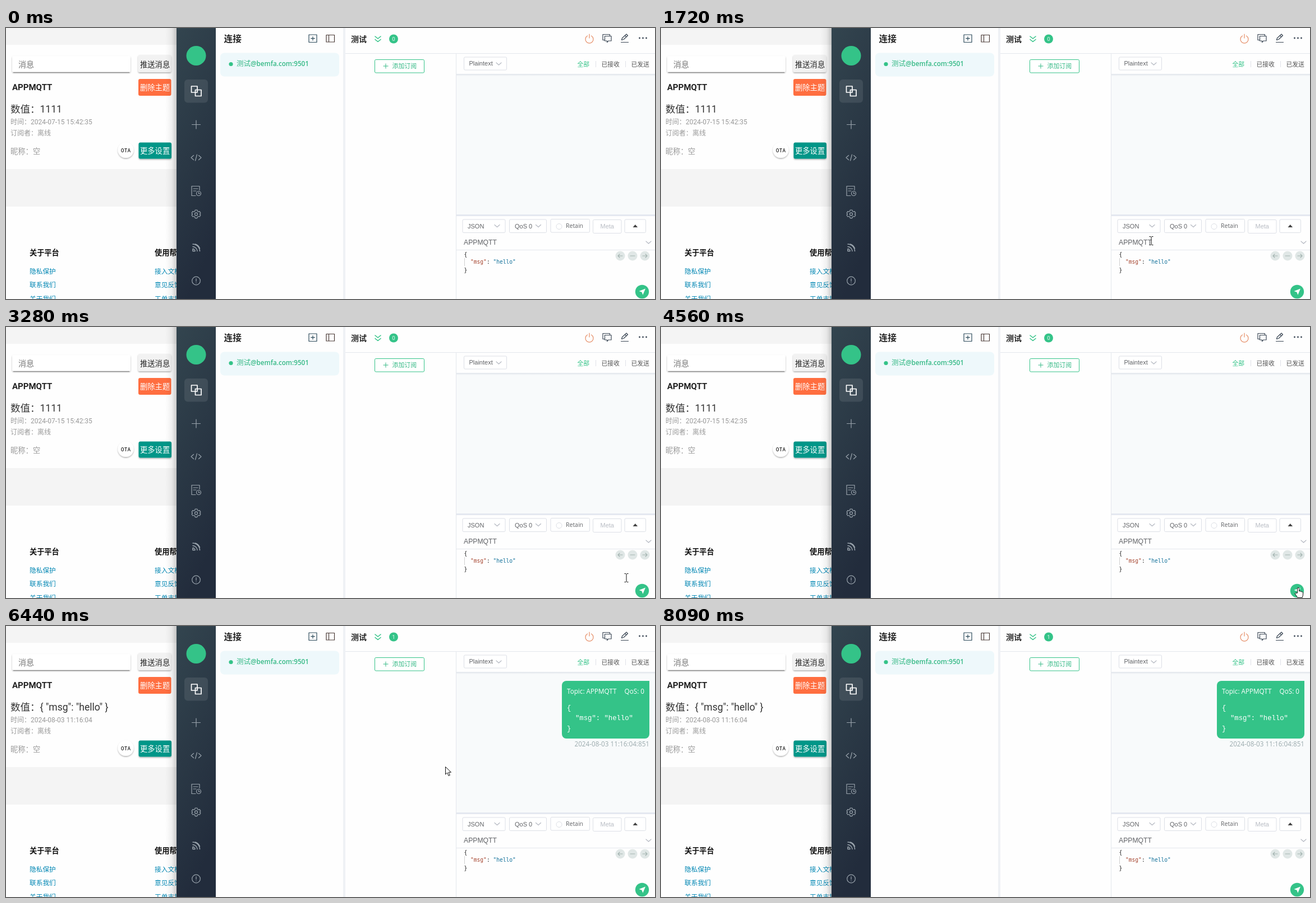
An HTML page that plays this animation: 1157x484 px, repeating every 8.16 s.

```html
<!DOCTYPE html>
<html lang="zh-CN">
<head>
<meta charset="utf-8">
<style>
html, body { margin: 0; width: 100%; height: 100%; overflow: hidden; background: #fff }
svg { display: block; width: 100vw; height: 100vh }
text { white-space: pre; font: 12px Roboto, "Noto Sans CJK SC", "Noto Sans CJK", sans-serif }
.app text { font-family: "Open Sans", "Noto Sans CJK SC", "Noto Sans CJK", sans-serif; font-size: 11.7px }
.app .ui text { font-family: "Liberation Sans", Arial, sans-serif; font-size: 11px; fill: #606266 }
.app .code text { font-family: "DejaVu Sans Mono", monospace; font-size: 9.6px }
.app .msg .code text { font-family: "Liberation Mono", monospace; font-size: 12.25px }
.app .topic text { font-family: "Liberation Sans", Arial, sans-serif; font-size: 12.2px }
.btn text { font-size: 13.3px; font-weight: 500 }
.foot text { font-size: 13.2px; font-weight: 700 }
.foot .links text { font-size: 11.7px; font-weight: 500 }
.line { fill: none; stroke-width: 1.2; stroke-linecap: round; stroke-linejoin: round }
.box rect { fill: #fff; stroke: #dcdfe6 }
</style>
</head>
<body>
<svg viewBox="0 0 1157 484" preserveAspectRatio="none">
<defs>
  <linearGradient id="bar" x2="0.3" y2="1"><stop stop-color="#33454f"/><stop offset="1" stop-color="#222c3c"/></linearGradient>
  <linearGradient id="edge"><stop stop-color="#000" stop-opacity="0"/><stop offset=".55" stop-color="#000" stop-opacity=".05"/><stop offset="1" stop-color="#000" stop-opacity=".2"/></linearGradient>
  <linearGradient id="fall" x2="0" y2="1"><stop stop-color="#dfe4ea"/><stop offset="1" stop-color="#f8fafb"/></linearGradient>
  <filter id="lift" x="-20%" y="-20%" width="140%" height="160%"><feDropShadow dx="0" dy="1.5" stdDeviation="1.2" flood-opacity=".32"/></filter>
  <clipPath id="selClip"><rect class="sel" x="876" y="369" width="0" height="27"/></clipPath>
</defs>

<!-- web console -->
<rect width="304" height="484" fill="#fefefe"/>
<path d="M0 0H304V30H0zM0 252H304V319H0z" fill="#f4f4f4"/>
<rect x="11" y="50" width="211" height="29" rx="3" fill="#fff" filter="url(#lift)"/>
<path d="M13 79.300H220" stroke="#777"/>
<text x="22" y="70" fill="#777" style="font-size:14px">消息</text>
<g class="btn" fill="#fff">
  <rect x="235.500" y="48" width="59" height="31" rx="3" fill="#f2f2f2" filter="url(#lift)"/>
  <text x="239" y="69.500" fill="#222" style="font-weight:400">推送消息</text>
  <rect x="236" y="91" width="58.500" height="30" rx="3" fill="#ff6e40"/>
  <text x="239" y="111">删除主题</text>
  <rect x="236.500" y="204.500" width="58.500" height="29" rx="3" fill="#009688" filter="url(#lift)"/>
  <text x="239" y="224">更多设置</text>
</g>
<text x="11" y="111" fill="#222" style="font-size:15px;font-weight:600">APPMQTT</text>
<text id="value" x="8" y="151" fill="#333" style="font-size:17.5px"></text>
<g fill="#999">
  <text id="time" x="8" y="172"></text>
  <text x="8" y="192">订阅者：离线</text>
  <text x="8" y="225" style="font-size:13.3px">昵称：空</text>
</g>
<circle cx="213.500" cy="218" r="14" fill="#fff" filter="url(#lift)"/>
<text x="204.700" y="221.500" fill="#222" style="font-size:8.4px;font-weight:500;letter-spacing:.9px">OTA</text>
<g class="foot" fill="#111">
  <text x="42" y="406">关于平台</text>
  <text x="265" y="406">使用帮助</text>
  <g id="links" class="links" fill="#0086b3"></g>
</g>
<rect x="284" width="20" height="484" fill="url(#edge)"/>

<!-- desktop client -->
<g class="app">
<rect x="304" width="853" height="484" fill="#fefefe"/>
<rect x="304" width="70" height="484" fill="url(#bar)"/>
<circle cx="339" cy="49.500" r="17.500" fill="#34c388"/>
<rect x="318" y="92" width="42" height="41.500" rx="6" fill="#fff" fill-opacity=".09"/>
<g class="line" stroke="#99a3ac">
  <path d="M330.500 104h10.500v11h-10.500zM337.500 110.500h10.500v11h-10.500z" stroke="#fff" stroke-width="1.700"/>
  <path d="M331.500 172.500h15M339 165v15"/>
  <path d="M334.500 227.500l-4.500 4 4.500 4M343.500 227.500l4.500 4-4.500 4M340.500 226l-3 11"/>
  <path d="M338 299.500h-7V282.500h14v7M334 287h8M334 291h5"/>
  <circle cx="343.500" cy="295.500" r="4"/><path d="M343.500 293.500v2.200h1.800"/>
  <path d="M337.300 325h3.400l.7 2.200 1.600.9 2.200-.5 1.700 3-1.500 1.700 0 0 1.500 1.700-1.700 3-2.200-.5-1.600.9-.7 2.200h-3.400l-.7-2.200-1.600-.9-2.200.5-1.700-3 1.500-1.700-1.500-1.700 1.700-3 2.200.5 1.600-.9z"/>
  <circle cx="339" cy="332.400" r="2.500"/>
  <path d="M333 386a13 13 0 0 1 12.500 12.500M333 390.500a8.500 8.500 0 0 1 8 8M333 394.500a4 4 0 0 1 4 4h-4zM337.500 386a13 13 0 0 1 8 7.500" stroke-width="1.500"/>
  <circle cx="339" cy="451.500" r="7.300"/><path d="M339 447.500v5M339 455v.4"/>
</g>

<text x="388.500" y="25" fill="#262626" style="font-size:15.7px;font-weight:700">连接</text>
<g class="line" stroke="#2c4a5a">
  <path d="M540 12h14v13.500h-14zM547 15.500v6.500M543.700 18.700h6.600"/>
  <path d="M571 12.500h14.500v12.500H571zM575.500 12.500v12.500" stroke="#4a3a36"/>
</g>
<rect x="382" y="44.500" width="212" height="42" rx="7" fill="#eef8fb"/>
<circle cx="401" cy="64.500" r="3.600" fill="#34c388"/>
<text x="411" y="68" fill="#34b985" style="font-weight:600"><tspan font-weight="400" style="font-weight:400;font-size:12.5px">测试</tspan>@bemfa.com:9501</text>
<rect x="601" width="4" height="484" fill="#eff1f5"/>

<text x="615" y="25" fill="#262626" style="font-size:14px;font-weight:700">测试</text>
<path class="line" d="M658 15l5 4 5-4M658 20.500l5 4 5-4" stroke="#34c388" style="stroke-width:1.6"/>
<circle cx="691" cy="19.500" r="8" fill="#34c388"/>
<text id="count" x="691" y="23" fill="#fff" text-anchor="middle" style="font-size:9.5px"></text>
<g class="line" stroke="#3b4755">
  <path d="M1036.500 14a7 7 0 1 0 7 0M1040 11v7" stroke="#e58a62"/>
  <path d="M1067 21.500h-3V11.500h12.500v3M1067.500 14.500h11.500v8.500h-5l-2.500 2.500v-2.500h-4z"/>
  <path d="M1096.500 25.500h13M1097.500 21.500l1-3.500 7.500-7 2.500 2.500-7.500 7zM1103.500 13.500l2.500 2.500"/>
</g>
<g fill="#3b4755"><circle cx="1129.500" cy="18" r="1.400"/><circle cx="1135.500" cy="18" r="1.400"/><circle cx="1141.500" cy="18" r="1.400"/></g>
<path d="M605 45.500H1157M802.500 46V484" stroke="#e4e7ed"/>
<rect x="657.500" y="56.500" width="88" height="23.500" rx="2" fill="#fff" stroke="#34c388"/>
<path d="M672.500 68h9M677 63.500v9" stroke="#34b985"/>
<text x="688.500" y="72" fill="#34b985" style="font-size:10.9px">添加订阅</text>

<rect x="803" y="82" width="354" height="252" fill="#f8fafb"/>
<rect x="803" y="82" width="354" height="4" fill="url(#fall)"/>
<rect x="803" y="333" width="354" height="3" fill="#e4e8f0"/>
<path d="M803 396.500H1157" stroke="#e4e7ed"/>
<g fill="#555">
  <text x="1018.500" y="68.500" fill="#34c388" style="font-size:10.8px">全部</text>
  <text x="1061.500" y="68.500" style="font-size:10.8px">已接收</text>
  <text x="1114.500" y="68.500" style="font-size:10.8px">已发送</text>
</g>
<path d="M1051.500 59v11M1104.500 59v11" stroke="#dfe2e8"/>

<g class="ui box">
  <rect x="816.500" y="52" width="76" height="23" rx="2"/><text x="825.500" y="67">Plaintext</text>
  <rect x="814" y="342" width="76" height="23.500" rx="2"/><text x="823" y="357.500">JSON</text>
  <rect x="897.500" y="342" width="66" height="23.500" rx="2"/><text x="907" y="357.500">QoS 0</text>
  <rect x="971" y="341.500" width="69.500" height="23.500" rx="2"/><text x="998" y="357" style="font-family:'Open Sans',sans-serif;font-size:10.5px">Retain</text>
  <rect x="1046.500" y="342.500" width="50.500" height="24" rx="2"/><text x="1059.500" y="358" style="fill:#b8bcc4">Meta</text>
  <rect x="1103" y="342" width="37.500" height="23.500" rx="2"/>
</g>
<circle cx="986" cy="354.500" r="5" fill="#fff" stroke="#dcdfe6"/>
<path d="M1117.500 356l4.300-5 4.300 5z" fill="#444"/>
<path class="line" d="M874 62l4.500 4 4.500-4M871 351.500l4.500 4 4.500-4M944.500 351.500l4.500 4 4.500-4M1141 381l4.500 4 4.500-4" stroke="#b5b9c2"/>

<g class="topic">
  <text x="816" y="386.500" fill="#606266">APPMQTT</text>
  <rect class="sel" x="876" y="369" width="0" height="27" fill="#0078d7"/>
  <text x="816" y="386.500" fill="#fff" clip-path="url(#selClip)">APPMQTT</text>
  <rect id="caret" x="875" y="375" width="1" height="15" fill="#333"/>
</g>
<g class="code" fill="#222">
  <text x="816.500" y="407.500">{</text>
  <text x="828" y="421"><tspan fill="#a5432d">"msg"</tspan>: <tspan fill="#0f6f99">"hello"</tspan></text>
  <text x="816.500" y="435.500">}</text>
</g>
<path d="M817.500 411v14" stroke="#d0d0d0"/>
<g fill="#e0e7e6"><circle cx="1095" cy="407" r="8.500"/><circle cx="1117" cy="407" r="8.500"/><circle cx="1139" cy="407" r="8.500"/></g>
<path class="line" d="M1099 407h-8m3-3l-3 3 3 3M1113 407h8M1135 407h8m-3-3l3 3-3 3" stroke="#a3b3b0"/>
<circle cx="1134" cy="471" r="12.200" fill="#34c388"/>
<path d="M1140 465.500l-11.500 4.500 5 1.700 1.800 5z" fill="#fff"/>

<g id="msg" class="msg">
  <path d="M999 98H1147V193a8 8 0 0 1-8 8H999a8 8 0 0 1-8-8V106a8 8 0 0 1 8-8z" fill="#34c388"/>
  <g fill="#fff">
    <text x="1000" y="120.500">Topic: APPMQTT</text>
    <text x="1138" y="120.500" text-anchor="end">QoS: 0</text>
    <g class="code">
      <text x="1000" y="150">{</text>
      <text x="1015" y="168">"msg": "hello"</text>
      <text x="1000" y="186.500">}</text>
    </g>
  </g>
  <text x="1147" y="214.500" fill="#9aaaad" text-anchor="end">2024-08-03 11:16:04:851</text>
</g>
</g>

<g id="beam" fill="none" stroke="#111"><path d="M-3.500-7.500h2.500l1 1 1-1h2.500M0-6.500v13M-3.500 7.500h2.500l1-1 1 1h2.500"/></g>
<path id="arrow" d="M.5.500V14l3.200-3 2.300 5.500 2.300-1L6 10.200h4.500z" fill="#fff" stroke="#111"/>
<path id="hand" d="M-1.500 9V1a1.500 1.500 0 0 1 3 0v5c.5-1 2.500-.8 2.500.5.500-.8 2.300-.5 2.300.8.500-.5 2.200-.3 2.200 1.200V13l-1.500 4.500h-8L-5.300 11c-1-1.500.8-3 2.300-1.500z" fill="#fff" stroke="#111"/>
</svg>
<script>
const $ = id => document.getElementById(id);
const LOOP = 8160, SENT = 4690, RECEIVED = 5550, GONE = 7210;

// Pointer legs: first step, last step, number of steps, end x, end y
const legs = [
  [480, 600, 3, 1035, 452], [760, 760, 1, 999, 446], [950, 1070, 3, 905, 389],
  [1220, 1400, 3, 879, 388], [1650, 1720, 2, 874, 380], [1800, 1990, 3, 820, 377],
  [2240, 2360, 2, 846, 380], [2710, 2830, 3, 937, 384], [2990, 3280, 5, 1106, 448],
  [3370, 3630, 3, 1135, 467], [3910, 4160, 4, 1137, 468], [4560, 4560, 1, 1136, 466],
  [4690, 4690, 1, 992, 286], [5420, 5420, 1, 971, 238], [5550, 5610, 2, 812, 235],
  [5760, 5880, 2, 760, 240], [6100, 6100, 1, 762, 243], [6440, 6440, 1, 783, 251],
  [6540, 6750, 3, 648, 190], [6970, 7090, 2, 1150, 445]
];

function pointer(t) {
  let x = 1101, y = 490;
  for (const [start, end, n, tx, ty] of legs) {
    if (t < start) break;
    const step = n > 1 ? (end - start) / (n - 1) : 1;
    const k = Math.min(n, Math.floor((t - start) / step + 1e-6) + 1) / n;
    x += (tx - x) * k;
    y += (ty - y) * k;
  }
  return [Math.round(x), Math.round(y)];
}

const show = (el, on) => el.setAttribute("visibility", on ? "visible" : "hidden");
const within = (t, a, b) => t >= a && t < b;

[["隐私保护", "接入文档"], ["联系我们", "意见反馈"], ["关于我们", "工单支持"]].forEach((row, i) =>
  row.forEach((label, j) => {
    $("links").innerHTML += `<text x="${42 + 223 * j}" y="${438.5 + 24.5 * i}">${label}</text>`;
  }));

function draw(t) {
  const [x, y] = pointer(t);
  const overSend = Math.hypot(x - 1134, y - 471) < 12.5;
  const kind = !within(t, 480, GONE) ? "" : t >= SENT ? "arrow" : overSend ? "hand" : "beam";
  for (const id of ["beam", "arrow", "hand"]) {
    show($(id), id === kind);
    $(id).setAttribute("transform", `translate(${x} ${y})`);
  }

  const left = !within(t, 1800, 2360) ? 876 : t < 1990 ? x : 816;
  for (const el of document.querySelectorAll(".sel")) {
    el.setAttribute("x", left);
    el.setAttribute("width", 876 - left);
  }
  show($("caret"), within(t, 2360, 2830) || within(t, 3370, 3910));

  const received = t >= RECEIVED;
  $("value").textContent = "数值：" + (received ? '{ "msg": "hello" }' : "1111");
  $("time").textContent = "时间：" + (received ? "2024-08-03 11:16:04" : "2024-07-15 15:42:35");
  $("count").textContent = t >= SENT ? 1 : 0;
  show($("msg"), t >= SENT);
}

const begin = performance.now();
function tick() {
  draw((performance.now() - begin) % LOOP);
  requestAnimationFrame(tick);
}
tick();
</script>
</body>
</html>
```
